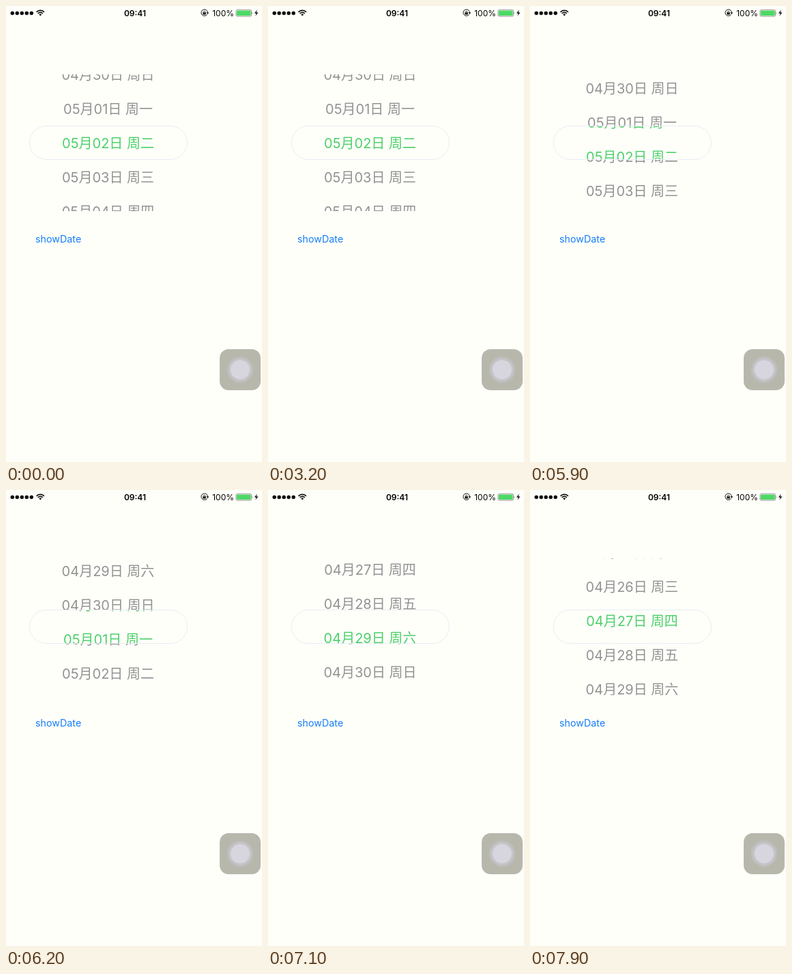
Write an HTML page that moves like this. It is 375x667 px and loops after 8000 ms.

```html
<!DOCTYPE html>
<html lang="zh-CN">
<head>
<meta charset="utf-8">
<title>Date picker</title>
<style>
  html, body { margin: 0; width: 100%; height: 100%; overflow: hidden; background: #fffffa; }
  svg { display: block; }
  text { font-family: Inter, "Noto Sans CJK SC", "Noto Sans CJK", sans-serif; }
  .row { font-size: 20px; text-anchor: middle; }
  .status { font-size: 12px; }
  .gray { fill: #929292; }
  .green { fill: #4cd06a; }
  .line { fill: none; stroke: #111; }
</style>
</head>
<body>
<svg width="375" height="667" viewBox="0 0 375 667">
  <defs><g id="rows"></g></defs>

  <g id="dots" fill="#111"></g>
  <g class="line" stroke-width="1.7">
    <path d="M44.6 8.8a8 8 0 0 1 11.4 0M46.7 11a5 5 0 0 1 7.2 0"/>
    <path d="M48.3 12.4a2.8 2.8 0 0 1 4 0L50.3 14.5z" fill="#111" stroke="none"/>
  </g>
  <text class="status" x="189" y="14.5" text-anchor="middle" font-weight="600">09:41</text>
  <g class="line">
    <path d="M294.6 12.4a4.7 4.7 0 1 1 .8-2.4"/>
    <path d="M293.4 9.6h4l-2 2.4z" fill="#111" stroke="none"/>
    <path d="M289.3 9.8v-1a1.3 1.3 0 0 1 2.6 0v1" stroke-width=".8"/>
    <rect x="288.4" y="9.4" width="4.4" height="3.2" fill="#111" stroke="none"/>
  </g>
  <text class="status" x="334" y="14.5" text-anchor="end">100%</text>
  <rect x="337" y="5.7" width="22.6" height="9.4" rx="1.8" fill="#fffffa" stroke="#777" stroke-width=".8"/>
  <rect x="338" y="6.7" width="20.6" height="7.4" rx=".8" fill="#4cd964"/>
  <path d="M360.3 8.8q1.5 1.6 0 3.2z" fill="#777"/>
  <path d="M367.8 5.6l-3.8 5.2h2.6l-1.2 4 4.1-5.4h-2.7z" fill="#111"/>

  <svg class="gray" y="100" width="375" height="75" viewBox="0 100 375 75"><use href="#rows"/></svg>
  <svg class="green" y="175" width="375" height="50" viewBox="0 175 375 50"><use href="#rows"/></svg>
  <svg class="gray" y="225" width="375" height="75" viewBox="0 225 375 75"><use href="#rows"/></svg>
  <rect x="34.5" y="175.5" width="231" height="49" rx="24.5" fill="none" stroke="#e9ecf2"/>

  <text x="43" y="345.5" font-size="14.3" fill="#157efb">showDate</text>

  <rect x="313" y="502" width="60" height="60" rx="13" fill="#b7b7ac"/>
  <circle cx="343" cy="532" r="19.5" fill="#bdbdba"/>
  <circle cx="343" cy="532" r="17" fill="#c5c4c8"/>
  <circle cx="343" cy="532" r="14" fill="#d7d5dd"/>
</svg>
<script>
const LOOP = 8000, STEP = 100, ROW = 50;
// Scroll keys: [ms, px], three successive drags with a soft release
const keys = [
  [0, 0], [5700, 0], [5900, 20], [6200, 68], [6300, 82], [6500, 99],
  [6600, 107.5], [7100, 166], [7300, 189], [7500, 200], [7600, 207], [7900, 241]
];
const rows = document.getElementById('rows');
const dots = document.getElementById('dots');

function add(parent, tag, attrs, text = '') {
  const el = document.createElementNS('http://www.w3.org/2000/svg', tag);
  for (const name in attrs) el.setAttribute(name, attrs[name]);
  el.textContent = text;
  parent.append(el);
}

function dateLabel(offset) {
  const date = new Date(Date.UTC(2017, 4, 2 + offset));
  const [, month, day] = date.toISOString().slice(0, 10).split('-');
  return `${month}月${day}日 周${'日一二三四五六'[date.getUTCDay()]}`;
}

function scrollAt(time) {
  const next = keys.findIndex(([at]) => at > time);
  if (next < 0) return keys[keys.length - 1][1];
  const [t0, y0] = keys[next - 1], [t1, y1] = keys[next];
  return y0 + (y1 - y0) * (time - t0) / (t1 - t0);
}

for (let i = 0; i < 5; i++) add(dots, 'circle', { cx: 9.3 + 7 * i, cy: 10.4, r: 2.75 });
for (let i = -8; i <= 3; i++) {
  add(rows, 'text', { class: 'row', x: 149.5, y: 207.5 + ROW * i }, dateLabel(i));
}

function draw() {
  const time = Math.floor(performance.now() % LOOP / STEP) * STEP;
  rows.setAttribute('transform', `translate(0 ${scrollAt(time)})`);
  requestAnimationFrame(draw);
}
draw();
</script>
</body>
</html>
```
